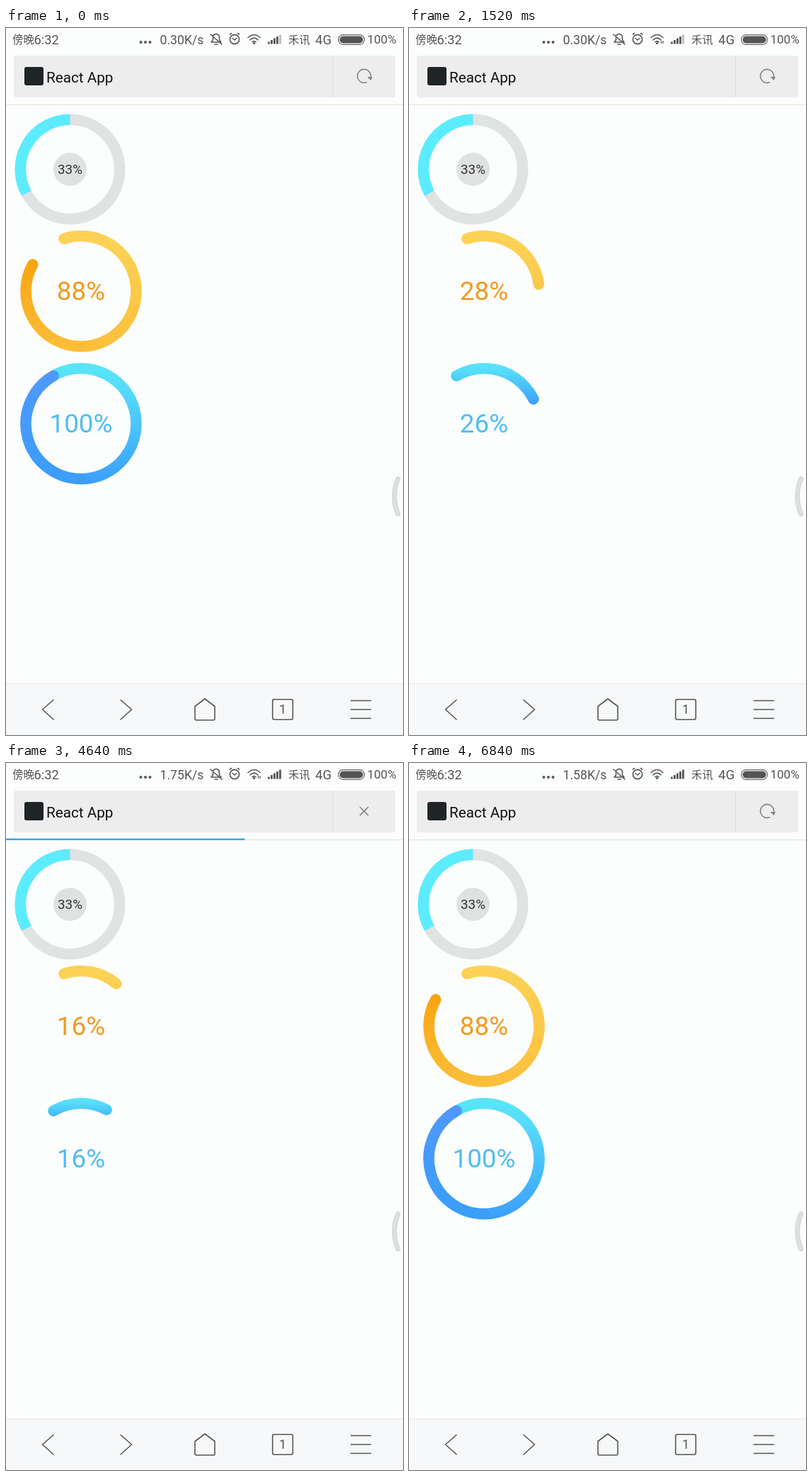
An HTML page that plays this animation: 561 by 998 pixels, repeating every 7360 ms.

```html
<!DOCTYPE html>
<html lang="zh">
<head>
<meta charset="utf-8">
<title>Progress rings</title>
<style>
  html, body { margin: 0; width: 100%; height: 100%; overflow: hidden; background: #fcfdfd; }
  svg { display: block; width: 561px; height: 998px; }
  text { font-family: Roboto, "Noto Sans CJK SC", "Noto Sans CJK", sans-serif; }
  .status text { fill: #555; }
  .line { fill: none; stroke: #555; stroke-width: 1.6; stroke-linecap: round; stroke-linejoin: round; }
  .thin { fill: none; stroke: #858585; stroke-width: 1.6; }
</style>
</head>
<body>
<svg viewBox="0 0 561 998">
  <defs>
    <linearGradient id="goldRight" gradientUnits="userSpaceOnUse" x1="0" x2="0" y1="286" y2="457">
      <stop stop-color="#fcd357"/><stop offset="1" stop-color="#fcbf3a"/>
    </linearGradient>
    <linearGradient id="goldLeft" gradientUnits="userSpaceOnUse" x1="0" x2="0" y1="457" y2="328">
      <stop stop-color="#fcbf3a"/><stop offset="1" stop-color="#f8a40f"/>
    </linearGradient>
    <linearGradient id="blueRight" gradientUnits="userSpaceOnUse" x1="0" x2="0" y1="473" y2="644">
      <stop stop-color="#59e6f6"/><stop offset=".2" stop-color="#56dcfb"/><stop offset="1" stop-color="#3a9efb"/>
    </linearGradient>
    <linearGradient id="blueLeft" gradientUnits="userSpaceOnUse" x1="0" x2="0" y1="644" y2="483">
      <stop stop-color="#3a9efb"/><stop offset="1" stop-color="#4f98fc"/>
    </linearGradient>
  </defs>
  <rect width="561" height="998" fill="#fcfdfd"/>

  <g class="status">
    <text x="9" y="22" font-size="15.5">傍晚</text>
    <text x="39.5" y="22.5" font-size="18.3">6:32</text>
    <g fill="#555"><circle cx="190.5" cy="20" r="2"/><circle cx="197" cy="20" r="2"/><circle cx="203.5" cy="20" r="2"/></g>
    <text id="speed" x="279.5" y="22.5" font-size="17.7" text-anchor="end"></text>
    <path class="line" d="M290 20H304L301.500 17V13Q301 8.500 297 8.500T292.500 13V17ZM295 23H299M289 9L305 23"/>
    <g class="line"><circle cx="323" cy="16" r="6.600"/><path d="M320 14.500L323 17L326 14.500M316.500 9L318.500 7.500M329.500 9L327.500 7.500"/></g>
    <g class="line" stroke-width="2"><path d="M342 13.500Q350.500 5.500 359 13.500M345 16.800Q350.500 11.500 356 16.800M348 19.800Q350.500 17.300 353 19.800"/></g>
    <circle cx="350.500" cy="21.500" r="1.600" fill="#555"/>
    <path id="traffic" d="M356.500 22V18M359 18V22" stroke="#666" stroke-width="1.300"/>
    <g id="signal" fill="#555"></g>
    <text x="399" y="22" font-size="15.3">禾讯</text>
    <text x="437" y="22.500" font-size="18.500">4G</text>
    <rect x="469.700" y="9.700" width="36.600" height="13.600" rx="6.500" fill="none" stroke="#666" stroke-width="1.200"/>
    <rect x="471.500" y="11.500" width="33" height="10" rx="5" fill="#555"/>
    <text x="510.500" y="22" font-size="17">100%</text>
  </g>

  <rect x="11" y="39" width="539" height="59" rx="3" fill="#ededed"/>
  <path d="M461.500 39V98" stroke="#dedede"/>
  <rect x="26" y="55" width="27" height="26" rx="3" fill="#1f2427"/>
  <text id="title" x="57" y="76.500" font-size="20.700" fill="#111"></text>
  <g id="refresh"><path class="thin" d="M510 76.500A9.500 9.500 0 1 1 515.500 69"/><path d="M510.500 69H518L515.500 74Z" fill="#858585"/></g>
  <path id="stop" class="thin" d="M500 62L512 74M512 62L500 74"/>
  <path d="M0 108.500H561" stroke="#e4e1d4"/>
  <rect id="bar" y="106.500" height="2.500" fill="#3ea6ea"/>

  <g id="page">
    <g fill="none" stroke-width="15.600">
      <circle cx="90.500" cy="199.500" r="70.200" stroke="#e1e2e2"/>
      <path id="third" stroke="#5cecff"/>
    </g>
    <circle cx="90.500" cy="199.500" r="23.400" fill="#dfe2e0"/>
    <text x="90.500" y="206" font-size="18.800" fill="#333" text-anchor="middle">33%</text>
    <g id="rings" fill="none" stroke-width="15.600" stroke-linecap="round"></g>
  </g>

  <path d="M554 636.500Q543.500 661 554 686" fill="none" stroke="#c9caca" stroke-width="6.600" stroke-linecap="round"/>
  <path d="M554 636.500Q543.500 661 554 686" fill="none" stroke="#dfe0e2" stroke-width="5" stroke-linecap="round"/>

  <rect y="925" width="561" height="73" fill="#f7f8f9"/>
  <path d="M0 925.500H561" stroke="#e5e7e8"/>
  <g class="line">
    <path d="M67 948.500L51.500 962L67 976M162 948.500L177.500 962L162 976"/>
    <path d="M281 947L295 957.500V975Q295 977 293 977H269Q267 977 267 975V957.500Z"/>
    <rect x="376.700" y="947.700" width="28.600" height="28.600" rx="2.500"/>
    <path d="M487.500 949.500H515.500M487.500 962H515.500M487.500 974.500H515.500"/>
  </g>
  <text x="391" y="968" font-size="18" fill="#555" text-anchor="middle">1</text>
</svg>
<script>
const LOOP = 7360, STEP = 40, RATE = 0.0885;
// Each reload: tap accepted, when each ring starts counting.
const RELOADS = [
  { load: 945, gold: 1200, blue: 1220 },
  { load: 4200, gold: 4455, blue: 4455 }
];
const $ = id => document.getElementById(id);

function add(parent, tag, attrs) {
  const node = document.createElementNS("http://www.w3.org/2000/svg", tag);
  for (const key in attrs) node.setAttribute(key, attrs[key]);
  return parent.appendChild(node);
}
const show = (node, on) => node.setAttribute("visibility", on ? "inherit" : "hidden");

// Degrees run clockwise from twelve o'clock.
function arc(cx, cy, r, from, to) {
  const point = deg => {
    const a = deg * Math.PI / 180;
    return `${(cx + r * Math.sin(a)).toFixed(2)} ${(cy - r * Math.cos(a)).toFixed(2)}`;
  };
  return `M${point(from)}A${r} ${r} 0 ${to - from > 180 ? 1 : 0} 1 ${point(to)}`;
}

function makeRing(name, cy, start, goal, color) {
  const right = add($("rings"), "path", { stroke: `url(#${name}Right)` });
  const left = add($("rings"), "path", { stroke: `url(#${name}Left)` });
  const label = add($("rings"), "text", {
    x: 106, y: cy + 12.8, "font-size": 36.8, fill: color, stroke: "none", "text-anchor": "middle"
  });
  return { name, cy, start, goal, right, left, label };
}

function drawRing(ring, elapsed) {
  const value = Math.max(0, Math.min(ring.goal, Math.floor(elapsed * RATE)));
  const end = ring.start + value * 3.6;
  ring.right.setAttribute("d", arc(106, ring.cy, 78, ring.start, Math.min(end + 0.01, 180)));
  show(ring.left, end > 180);
  if (end > 180) ring.left.setAttribute("d", arc(106, ring.cy, 78, 180, end));
  ring.label.textContent = value + "%";
  if (ring.name === "blue") {
    const low = ring.cy - 78 * Math.cos(Math.min(end, 180) * Math.PI / 180);
    $("blueRight").setAttribute("y2", Math.max(low + 7.8, 510));
  }
}

const rings = [
  makeRing("gold", 371.5, -18, 88, "#f19a20"),
  makeRing("blue", 558.5, -30, 100, "#4fbdf2")
];
const bars = [0, 1, 2, 3, 4].map(i =>
  add($("signal"), "rect", { x: 370 + i * 4, y: 19.5 - i * 2.5, width: 2.8, height: 3 + i * 2.5 }));
$("third").setAttribute("d", arc(90.5, 199.5, 70.2, -118.8, 0));

function draw(t) {
  const run = RELOADS.filter(r => t >= r.load).pop();
  const since = run ? t - run.load : Infinity;
  const ready = run ? run.gold : 0;
  const loading = run && t < ready + 200;
  const fresh = run && t >= ready;

  $("title").textContent = run && t < ready - 20 ? "172.18.239.16:3000" : "React App";
  show($("stop"), loading);
  show($("refresh"), !loading);
  $("bar").setAttribute("width", loading ? 561 * (1 - Math.exp(-0.00209 * since)) : 0);
  show($("page"), !run || fresh || t < ready - 60);
  for (const ring of rings) drawRing(ring, fresh ? t - run[ring.name] : Infinity);

  $("speed").textContent = (t < 2280 ? "0.30" : t < 6320 ? "1.75" : "1.58") + "K/s";
  show($("traffic"), t >= 1200 && t < 4920);
  bars[4].setAttribute("opacity", t < 3920 ? 0.4 : 1);
}

let origin;
function tick(now) {
  origin ??= now;
  const t = (now - origin) % LOOP;
  draw(Math.floor(t / STEP) * STEP);
  requestAnimationFrame(tick);
}
draw(0);
requestAnimationFrame(tick);
</script>
</body>
</html>
```
